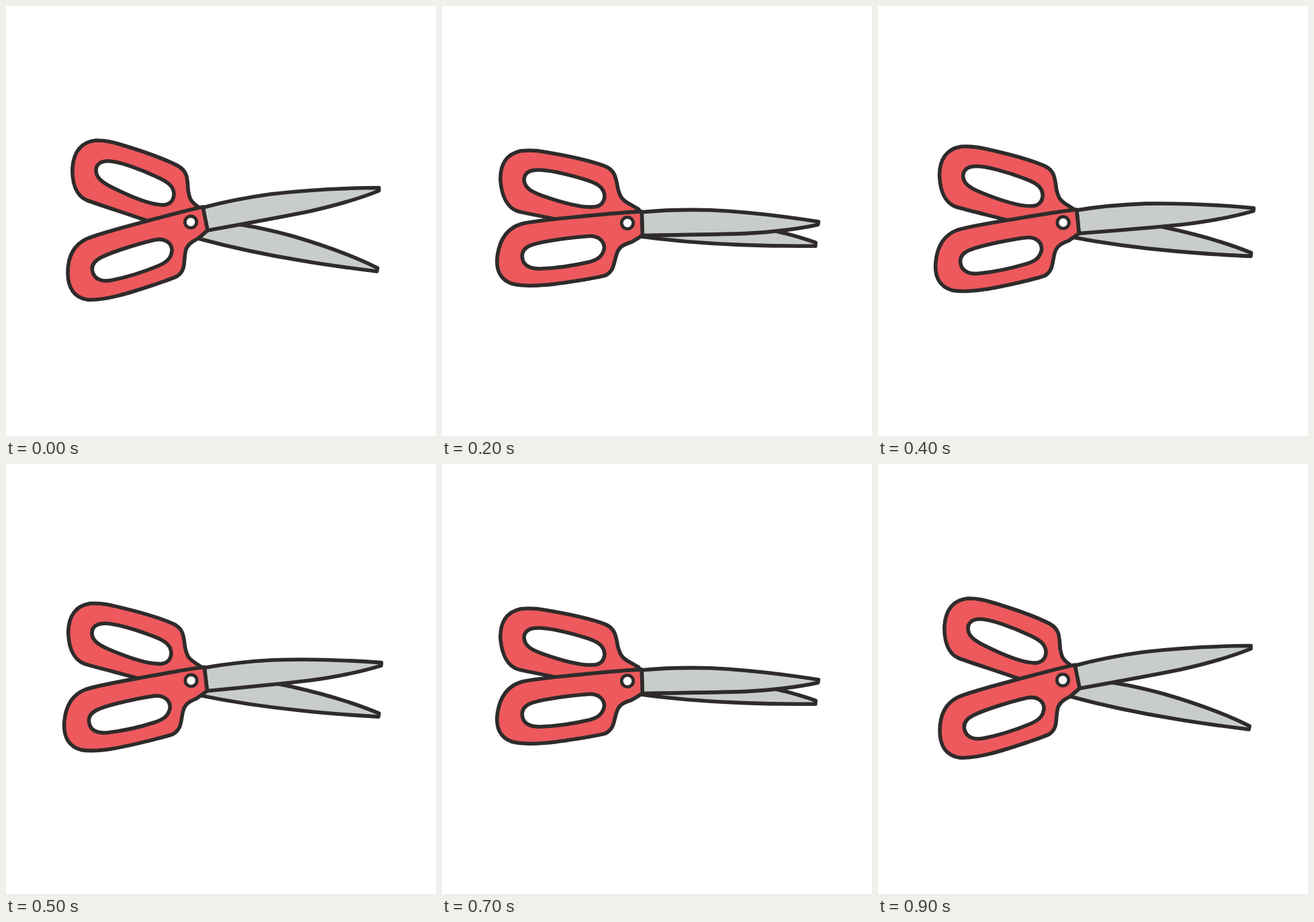
Recreate the animation shown at these times as an HTML page. Size 640 by 640 pixels, loop 1.3 s.

```html
<!DOCTYPE html>
<html lang="en">
<head>
<meta charset="utf-8">
<title>Scissors</title>
<style>
  html, body { margin: 0; width: 100%; height: 100%; overflow: hidden; background: #fff; }
  svg { display: block; width: 100%; height: 100%; }
  .ink { stroke: #2f2b2b; stroke-width: 5.6; stroke-linejoin: round; stroke-linecap: round; }
  .grip { fill: #ed595c; fill-rule: evenodd; }
  .blade { fill: #c9cdca; }
  .rivet { fill: #fff; stroke-width: 4.8; }
</style>
</head>
<body>
<svg viewBox="0 0 640 640">
  <g id="back" class="ink">
    <path class="blade" d="M286 346 C330 358 385 370 440 379 C480 386 520 391 552 395 L553 390
      C525 376 480 358 425 342 C395 334 370 328 345 325 L305 325 Z"/>
    <path class="grip" d="M298 308 L286 299 C275 291 273 287 271 274 C270 256 270 246 256 238 C235 227 200 215 170 206
      C155 201 143 200 134 200 C112 202 101 217 99 240 C98 263 104 282 120 289
      C145 298 180 309 214 321 L255 332 Z
      M148 231 C165 229 205 245 228 256 C245 264 250 271 250 281 C249 292 241 297 231 296
      C212 295 180 281 158 270 C142 262 134 255 134 245 C134 237 139 232 148 231 Z"/>
  </g>
  <g id="front" class="ink">
    <path class="blade" d="M293 300 C330 290 365 284 394 280 C445 274 500 271 555 270.5 L555 275
      C525 287 495 296 450 306 C400 316 350 325 300 334 Z"/>
    <path class="grip" d="M293 299 C260 306 225 316 195 324 C165 332 135 340 119 347 C99 357 92 376 92 397
      C92 420 102 434 121 437 C148 439 187 426 220 415 C234 410 247 406 255 402
      C268 393 264 381 267 366 C269 354 279 350 286 346 L300 334 Z
      M142 374 C160 365 200 353 222 348 C237 345 247 353 247 364 C246 376 238 382 226 387
      C202 397 178 404 158 408 C143 411 132 407 129 396 C126 386 132 379 142 374 Z"/>
  </g>
  <circle id="rivet" class="ink rivet" cx="275" cy="321.5" r="8.7"/>
</svg>
<script>
  const STEP = 100, LOOP = 1300;
  // How far the scissors are closed at each step; the last pose is held.
  const closed = [0, 0.5, 1, 0.75, 0.6, 0.5, 0.75, 1, 0.3, 0];
  const [back, front, rivet] = ["back", "front", "rivet"].map(id => document.getElementById(id));

  const turn = (part, angle, x, y) =>
    part.setAttribute("transform", `rotate(${angle} ${x} ${y})`);

  function draw(time) {
    const step = Math.floor((time % LOOP) / STEP);
    const amount = closed[Math.min(step, closed.length - 1)];
    turn(front, 9.5 * amount, 254, 328);
    turn(back, -7.15 * amount, 252, 346);
    rivet.setAttribute("transform", `translate(${amount} ${1.5 * amount})`);
  }

  let start;
  function tick(now) {
    start ??= now;
    draw(now - start);
    requestAnimationFrame(tick);
  }
  draw(0);
  requestAnimationFrame(tick);
</script>
</body>
</html>
```
